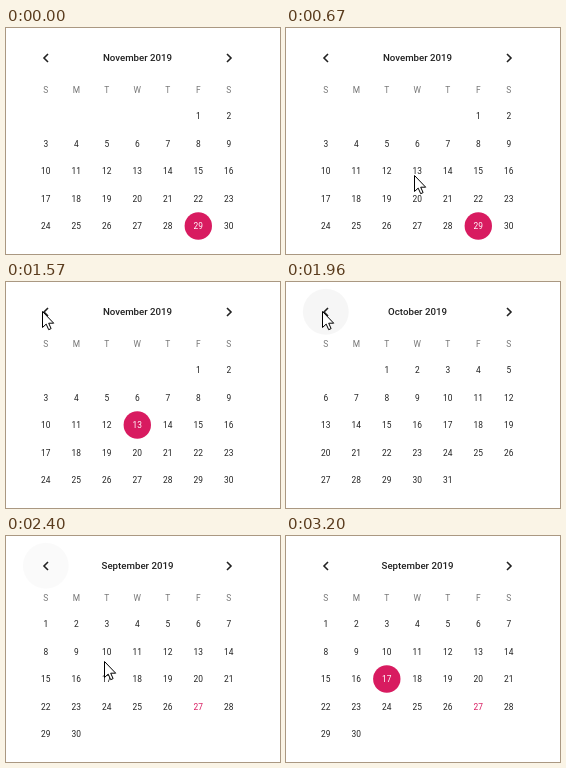
Recreate the animation shown at these times as an HTML page with a canvas. Size 274 px wide and 226 px high, loop 4.06 s.

```html
<!DOCTYPE html>
<html lang="en">
<head>
<meta charset="utf-8">
<title>Calendar</title>
<style>
html, body { margin: 0; width: 100%; height: 100%; overflow: hidden; background: #fff; }
canvas { display: block; width: 274px; height: 226px; }
</style>
</head>
<body>
<canvas id="stage"></canvas>
<script>
const W = 274, H = 226, LOOP = 4060;
const PINK = '#d81b60', INK = '#212121', GREY = '#757575';
const canvas = document.getElementById('stage');
const ctx = canvas.getContext('2d');
const scale = window.devicePixelRatio || 1;
canvas.width = Math.round(W * scale);
canvas.height = Math.round(H * scale);

const september = { title: 'September 2019', first: 0, days: 30, today: 27 };
const october = { title: 'October 2019', first: 2, days: 31 };
const november = { title: 'November 2019', first: 5, days: 30 };

// Bursts of screen updates: start, end, number of updates
const bursts = [
  [230, 670, 7], [1050, 1570, 8], [1880, 1960, 2],
  [2100, 2480, 6], [2620, 2620, 1], [2760, 3200, 7]
];

// Pointer tip: time, x, y
const pointerPath = [
  [230, 214, 213], [450, 158, 175], [670, 128, 147],
  [1120, 128, 147], [1270, 88, 78], [1420, 47, 19], [1570, 36, 29],
  [2020, 36, 29], [2100, 46, 39], [2176, 76, 74], [2328, 98, 125], [2480, 101, 141],
  [2620, 101, 141], [2760, 139, 155], [2907, 174, 174], [3127, 235, 214]
];
const hoverShade = [
  [1800, 0], [1960, 0.035], [2176, 0.055], [2252, 0.04], [2404, 0]
];

const clamp = v => Math.max(0, Math.min(1, v));

function snap(t) {
  let time = 0;
  for (const [start, end, count] of bursts) {
    if (t < start) break;
    const gap = (end - start) / Math.max(1, count - 1);
    time = t >= end ? end : start + Math.floor((t - start) / gap) * gap;
  }
  return time;
}

function track(keys, t, i = 1) {
  const next = keys.findIndex(k => k[0] > t);
  if (next === 0) return keys[0][i];
  if (next < 0) return keys[keys.length - 1][i];
  const a = keys[next - 1], b = keys[next];
  return a[i] + (b[i] - a[i]) * (t - a[0]) / (b[0] - a[0]);
}

function label(text, x, y, color, font) {
  ctx.font = font;
  ctx.fillStyle = color;
  ctx.fillText(text, x, y);
}

function disc(x, y, r, color) {
  ctx.fillStyle = color;
  ctx.beginPath();
  ctx.arc(x, y, r, 0, Math.PI * 2);
  ctx.fill();
}

function chevron(x, dir) {
  ctx.strokeStyle = INK;
  ctx.lineWidth = 1.6;
  ctx.beginPath();
  ctx.moveTo(x - 2 * dir, 26);
  ctx.lineTo(x + 2 * dir, 30);
  ctx.lineTo(x - 2 * dir, 34);
  ctx.stroke();
}

function drawMonth(month, dx, alpha, selected, strength = 1) {
  const dayFont = '8.4px Roboto, sans-serif';
  const column = i => 39.8 + 30.5 * i;
  ctx.save();
  ctx.globalAlpha = alpha;
  ctx.translate(dx, 0);
  label(month.title, 131.5, 33.2, INK, '500 9.7px Roboto, sans-serif');
  [...'SMTWTFS'].forEach((d, i) => label(d, column(i), 64.5, GREY, dayFont));
  for (let day = 1; day <= month.days; day++) {
    const cell = month.first + day - 1;
    const x = column(cell % 7), y = 88 + 27.5 * Math.floor(cell / 7);
    const active = day === selected;
    if (active) {
      ctx.globalAlpha = alpha * strength;
      disc(x, y, 13.7, PINK);
      ctx.globalAlpha = alpha;
    }
    const color = active ? '#fff' : day === month.today ? PINK : INK;
    label(day, x, y + 3, color, dayFont);
  }
  ctx.restore();
}

const leave = (month, dx, selected) => drawMonth(month, dx, 1 - dx / 40, selected);
const enter = (month, dx) => drawMonth(month, dx, clamp(1.4 + dx / 28));

function drawCalendar(t) {
  if (t < 1880) {
    const picked = t >= 1050;
    drawMonth(november, 0, 1, picked ? 13 : 29, t === 1050 ? 0.85 : 1);
  } else if (t < 1960) {
    leave(november, 24, 13);
    enter(october, -25);
  } else if (t < 2100) {
    drawMonth(october, 0, 1);
  } else if (t < 2170) {
    leave(october, 16);
  } else if (t < 2620) {
    enter(september, track([[2176, -13.6], [2252, -2.5], [2328, 0]], t));
  } else {
    drawMonth(september, 0, 1, 17, t < 2760 ? 0.85 : 1);
  }
}

function drawPointer(x, y) {
  const outline = [[0, 0], [0, 16], [3.7, 12.6], [6.2, 18.2], [8.6, 17.1], [6.2, 11.7], [11.2, 11.7]];
  ctx.beginPath();
  outline.forEach(([px, py]) => ctx.lineTo(x + 0.5 + px, y + 0.5 + py));
  ctx.closePath();
  ctx.fillStyle = '#fff';
  ctx.fill();
  ctx.strokeStyle = '#000';
  ctx.lineWidth = 1;
  ctx.stroke();
}

function render(now) {
  const t = snap(now % LOOP);
  ctx.setTransform(scale, 0, 0, scale, 0, 0);
  ctx.fillStyle = '#fff';
  ctx.fillRect(0, 0, W, H);
  ctx.textAlign = 'center';
  disc(39.8, 29.8, 23, `rgba(0, 0, 0, ${track(hoverShade, t)})`);
  chevron(40, -1);
  chevron(223, 1);
  drawCalendar(t);
  if (t >= 230 && t < 3200) {
    drawPointer(Math.round(track(pointerPath, t, 1)), Math.round(track(pointerPath, t, 2)));
  }
}

const began = performance.now();
function tick() {
  render(performance.now() - began);
  requestAnimationFrame(tick);
}
tick();
</script>
</body>
</html>
```
